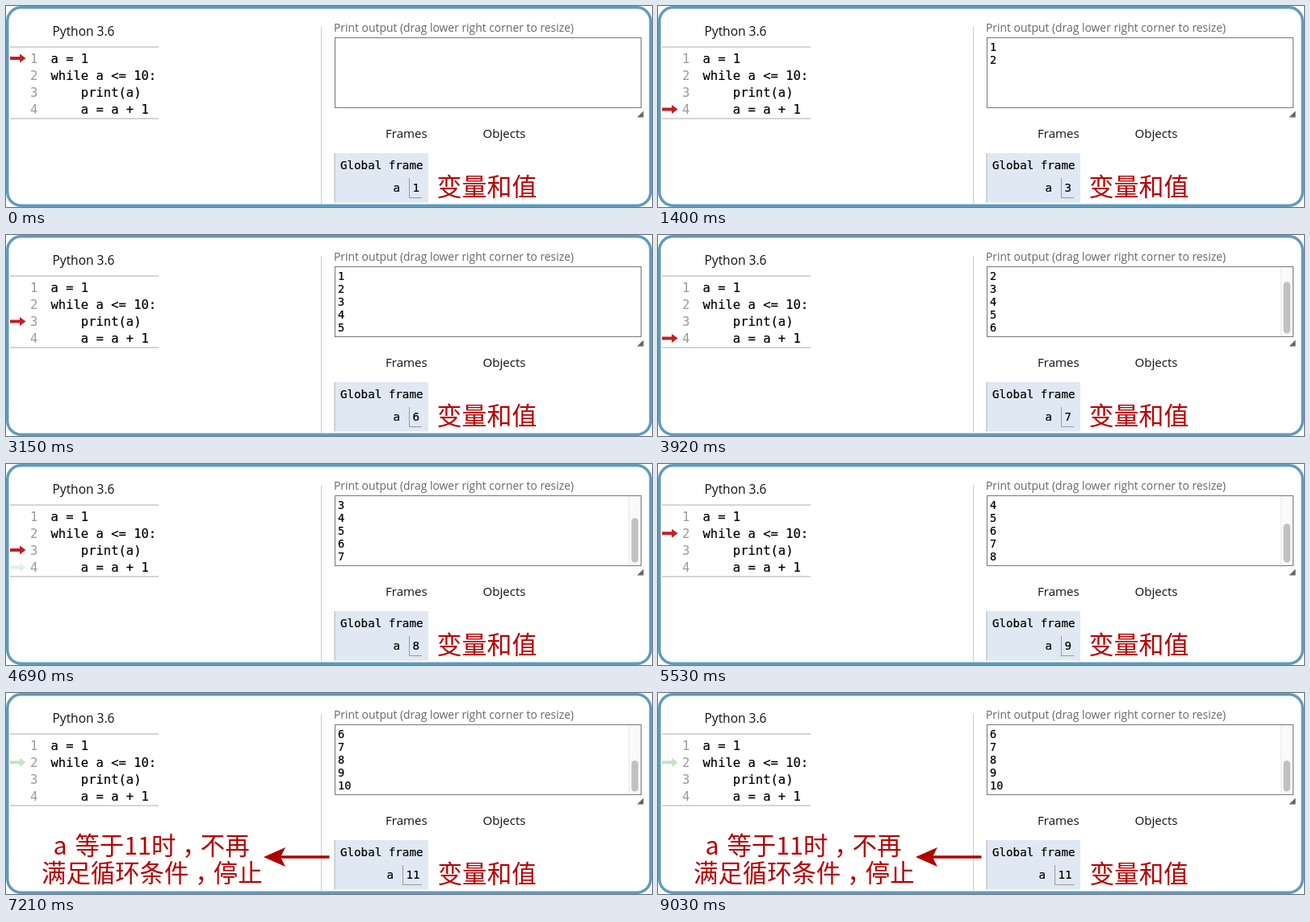
An HTML page that plays this animation: 800x250 px, repeating every 9.1 s.

```html
<!DOCTYPE html>
<html lang="zh-CN">
<head>
<meta charset="utf-8">
<title>while loop</title>
<style>
  html, body { margin: 0; width: 100%; height: 100%; overflow: hidden; background: #fff; }
  svg { display: block; width: 800px; height: 250px; }
  text { white-space: pre; fill: #111; }
  .ui { font-family: "Open Sans", "Noto Sans", sans-serif; font-size: 15.1px; font-weight: 500; }
  .code { font-family: "DejaVu Sans Mono", monospace; font-size: 15.5px; }
  .code, .code text { fill: #000; stroke: #000; stroke-width: 0.2px; }
  .code .number { fill: #999; stroke: none; }
  .small { font-size: 14.2px; }
  .output { font-size: 13.6px; }
  .note { font-family: "Noto Sans CJK SC", "Noto Sans CJK", sans-serif; font-size: 30.4px; font-weight: 500; fill: #b80000; }
</style>
</head>
<body>
<svg viewBox="0 0 800 250">
  <defs><path id="arrow" d="M5 -2H17V-5.5L24.5 0L17 5.5V2H5Z"/></defs>
  <rect x="1.75" y="1.75" width="796.5" height="246.5" rx="17" fill="#fff" stroke="#5f9bbd" stroke-width="3.5"/>
  <path d="M390.5 26V246" stroke="#ccc"/>
  <path d="M5 51H189M5 140H189" stroke="#aaa"/>

  <text class="ui" x="57.5" y="37" style="font-size:15.5px">Python 3.6</text>
  <g id="listing" class="code"></g>
  <use id="nextArrow" href="#arrow" fill="#c11f24"/>
  <use id="doneArrow" href="#arrow" fill="#bfe6bf"/>

  <text class="ui" x="406" y="32" style="font-size:13.9px;fill:#666">Print output (drag lower right corner to resize)</text>
  <rect x="407.5" y="39.5" width="379" height="87" fill="#fff" stroke="#777"/>
  <g id="output" class="code output"></g>
  <g id="scrollbar">
    <rect x="771" y="40" width="15" height="86" fill="#fafafa"/>
    <path d="M771.5 40V126" stroke="#e8e8e8"/>
    <rect id="thumb" x="774.5" width="8.5" rx="4.2" fill="#c1c1c1"/>
  </g>
  <path d="M781.5 138.5L789.5 130.5V138.5Z" fill="#666"/>

  <text class="ui" x="470" y="164">Frames</text>
  <text class="ui" x="590.5" y="164">Objects</text>
  <rect x="407" y="183" width="116" height="61.5" fill="#e0e8f3"/>
  <path d="M407 183V244.5" stroke="#a6b3b6"/>
  <text class="code small" x="414" y="203">Global frame</text>
  <text id="name" class="code small" y="231">a</text>
  <path id="cell" fill="none" stroke="#999"/>
  <text id="value" class="code small" y="231"></text>

  <text id="label" class="note" y="235.7">变量和值</text>
  <g id="ending">
    <text class="note" x="58.5" y="201">a <tspan dx="3">等于11时</tspan><tspan dx="8">，</tspan><tspan dx="-8">不再</tspan></text>
    <text class="note" x="44" y="235">满足循环条件<tspan dx="8">，</tspan><tspan dx="-8">停止</tspan></text>
    <path d="M400.5 204H336" stroke="#b00000" stroke-width="3.6"/>
    <path d="M319 204L346 192L340 204L346 216Z" fill="#b00000"/>
  </g>
</svg>
<script>
const LOOP = 9100, TICK = 70, LAST_STEP = 32;
const source = ["a = 1", "while a <= 10:", "    print(a)", "    a = a + 1"];
// Pace of the run: [tick, steps completed]
const pace = [[0, 0], [45, 15], [67, 22.43], [79, 25.9], [95, 31]];

const $ = id => document.getElementById(id);
const set = (el, attrs) => {
  for (const key in attrs) el.setAttribute(key, attrs[key]);
};
const show = (el, on) => { el.style.display = on ? "" : "none"; };
const addText = (parent, attrs, content = "") => {
  const el = document.createElementNS("http://www.w3.org/2000/svg", "text");
  set(el, attrs);
  el.textContent = content;
  return parent.appendChild(el);
};

source.forEach((line, i) => {
  const y = 70.5 + i * 21.2;
  addText($("listing"), { x: 30, y, class: "number" }, i + 1);
  addText($("listing"), { x: 55.5, y }, line);
});
const rows = Array.from({ length: 5 }, (_, i) => addText($("output"), { x: 411, y: 56 + i * 16 }));

const lineAt = step => step < 2 ? 1 : 2 + (step - 2) % 3;
const lineY = line => 65 + (line - 1) * 21.2;
const place = (el, y) => set(el, { transform: `translate(0 ${y})` });

function progressAt(tick) {
  for (let i = 1; i < pace.length; i++) {
    const [t0, p0] = pace[i - 1], [t1, p1] = pace[i];
    if (tick < t1) return p0 + (p1 - p0) * (tick - t0) / (t1 - t0) + 1e-6;
  }
  return LAST_STEP - 1;
}

function drawArrows(step, phase) {
  const done = step === LAST_STEP;
  const slide = Math.min(1, Math.max(0, (phase - 0.2) / 0.45));
  const from = lineY(lineAt(step - 1)), to = lineY(lineAt(step));
  show($("nextArrow"), !done);
  place($("nextArrow"), from + (to - from) * slide);
  place($("doneArrow"), done ? to : from);
  const flash = step > 1 && slide > 0 && slide < 1 ? 0.5 : 0;
  set($("doneArrow"), { opacity: done ? 1 : flash });
}

function drawOutput(count) {
  const first = Math.max(1, count - 4);
  rows.forEach((row, i) => { row.textContent = first + i <= count ? first + i : ""; });
  show($("scrollbar"), count > 5);
  const height = 386 / Math.max(count, 6);
  set($("thumb"), { y: 122.5 - height, height });
}

function drawVariable(a) {
  const left = a > 9 ? 491.5 : 499.5;
  set($("name"), { x: left - 20 });
  set($("value"), { x: left + 4 });
  $("value").textContent = a;
  set($("cell"), { d: `M${left} 214V238.5H515` });
}

function render(now) {
  const tick = Math.floor(now % LOOP / TICK);
  const progress = progressAt(tick);
  const step = Math.floor(progress) + 1;
  const ended = step >= LAST_STEP - 1;
  drawArrows(step, progress % 1);
  drawOutput(Math.min(10, Math.floor(step / 3)));
  drawVariable(Math.floor((step - 1) / 3) + 1);
  show($("ending"), ended);
  set($("label"), { x: ended ? 534.5 : 533.5 });
  $("label").style.fontSize = ended ? "30.6px" : "31px";
}

const start = performance.now();
function loop() {
  render(performance.now() - start);
  requestAnimationFrame(loop);
}
loop();
</script>
</body>
</html>
```
